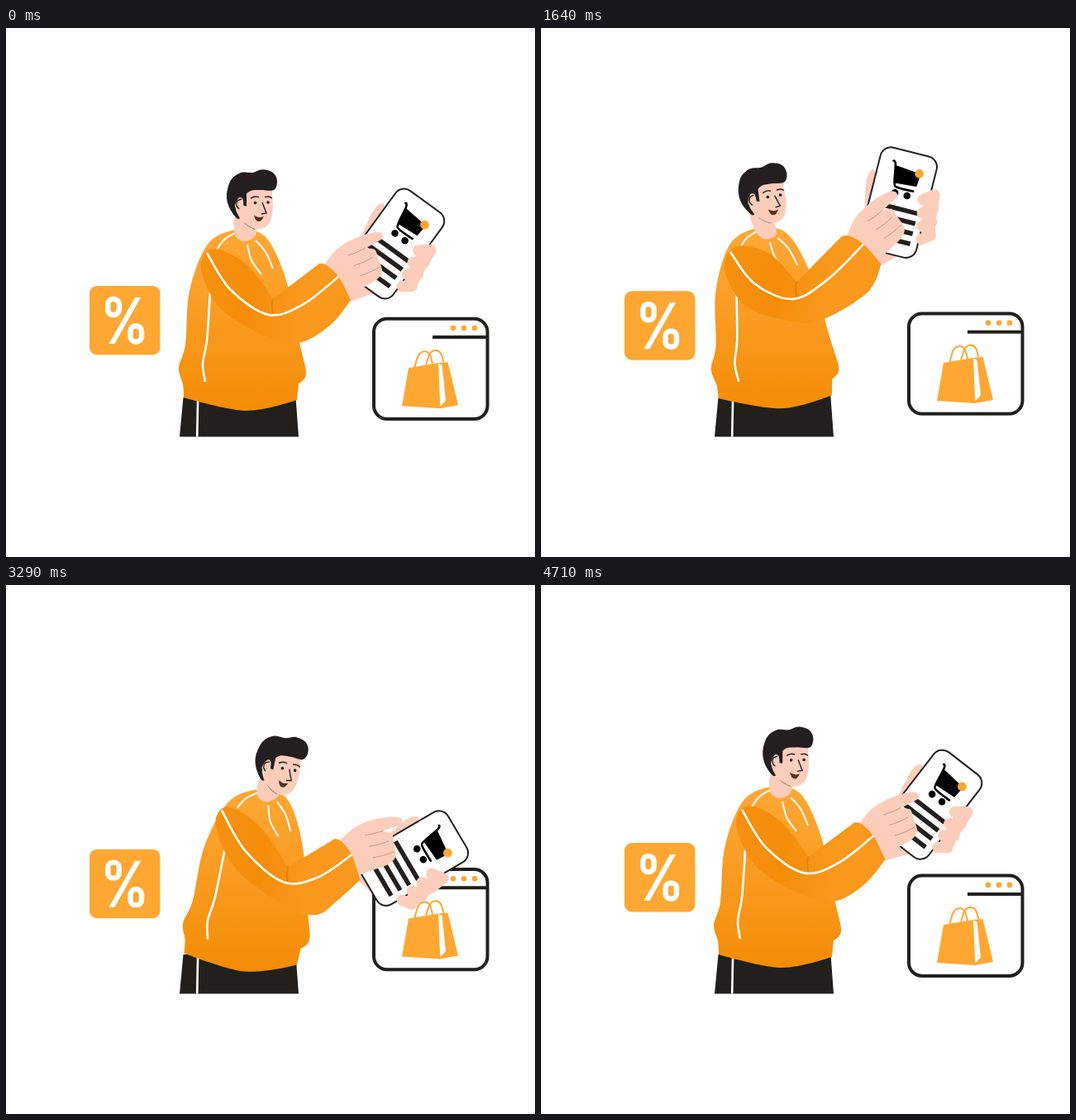
Write an HTML page with a canvas that moves like this. It is 640 px wide and 640 px high and loops after 4.78 s.

```html
<!DOCTYPE html>
<html lang="en">
<head>
<meta charset="utf-8">
<title>Mobile shopping</title>
<style>
html, body { margin: 0; width: 100%; height: 100%; overflow: hidden; background: #fff; }
canvas { display: block; width: 100vw; height: 100vh; }
</style>
</head>
<body>
<canvas id="stage" width="640" height="640"></canvas>
<script>
const ctx = document.getElementById('stage').getContext('2d');
const LOOP = 4780, STEPS = 67, STEP = LOOP / STEPS;
const ORANGE = '#ffa733', INK = '#21201d', HAIR = '#231f20', SKIN = '#fdcdbb', CREASE = '#b78f83';
const RAD = Math.PI / 180;

// Swing back (negative), through the middle, then forward. Softness blends
// a sine into a full ease, apart for the way out and the way home.
function swing(t, back, forward, softOut, softHome) {
  const phase = t / LOOP * 4, half = phase % 2;
  const p = half < 1 ? half : 2 - half;
  const soft = half < 1 ? softOut : softHome;
  const reach = Math.sin(p * Math.PI / 2) * (1 - soft) + (1 - Math.cos(p * Math.PI)) / 2 * soft;
  return phase < 2 ? -back * reach : forward * reach;
}
const bend = (u, linear, square) => linear * u + square * u * u;

function turn([x, y], angle) {
  const c = Math.cos(angle), s = Math.sin(angle);
  return [x * c - y * s, x * s + y * c];
}

// The upper body tips over the hips.
const leanBy = u => ([x, y, corner]) => {
  const a = bend(u, .113, .022);
  return [x + (450 - y) * a, y + (x - 235) * .6 * a, corner];
};

// The arm follows the shoulder sideways, lifts towards the hand, and turns at the wrist.
const armBy = (body, hand) => ([x, y, corner]) => {
  const reach = Math.max(0, Math.min(1, (x - 240) / 140));
  let px = x, py = y;
  if (x > 375) {
    const [rx, ry] = turn([x - 382, y - 291], bend(hand, 12, -2.7) * RAD);
    px = 382 + rx;
    py = 291 + ry;
  }
  return [px + bend(body, 17, 1), py + reach * bend(hand, 29.5, -6.5), corner];
};

// Spline through [x, y, corner] points.
function curve(pts, closed = true) {
  const n = pts.length;
  const at = i => closed ? pts[(i + n) % n] : pts[Math.max(0, Math.min(n - 1, i))];
  const tangent = i => {
    if (at(i)[2]) return [0, 0];
    const a = at(i - 1), b = at(i + 1);
    return [(b[0] - a[0]) / 6, (b[1] - a[1]) / 6];
  };
  ctx.beginPath();
  ctx.moveTo(pts[0][0], pts[0][1]);
  for (let i = 0; i < (closed ? n : n - 1); i++) {
    const a = at(i), b = at(i + 1), m = tangent(i), k = tangent(i + 1);
    ctx.bezierCurveTo(a[0] + m[0], a[1] + m[1], b[0] - k[0], b[1] - k[1], b[0], b[1]);
  }
}
function shape(pts, color) {
  curve(pts);
  ctx.fillStyle = color;
  ctx.fill();
}
function line(pts, color, width) {
  curve(pts, false);
  ctx.strokeStyle = color;
  ctx.lineWidth = width;
  ctx.stroke();
}
function poly(pts, color) {
  ctx.beginPath();
  pts.forEach(p => ctx.lineTo(p[0], p[1]));
  ctx.fillStyle = color;
  ctx.fill();
}
function dot(x, y, r, color) {
  ctx.beginPath();
  ctx.arc(x, y, r, 0, Math.PI * 2);
  ctx.fillStyle = color;
  ctx.fill();
}
function box(x, y, w, h, r, fill, stroke, width) {
  ctx.beginPath();
  ctx.roundRect(x, y, w, h, r);
  if (fill) { ctx.fillStyle = fill; ctx.fill(); }
  if (stroke) { ctx.strokeStyle = stroke; ctx.lineWidth = width; ctx.stroke(); }
}
function gradient(x0, y0, x1, y1, ...colors) {
  const g = ctx.createLinearGradient(x0, y0, x1, y1);
  colors.forEach((c, i) => g.addColorStop(i / (colors.length - 1), c));
  return g;
}
function placed(x, y, angle, draw) {
  ctx.save();
  ctx.translate(x, y);
  ctx.rotate(angle);
  draw();
  ctx.restore();
}

function drawTile(y) {
  placed(101, y, 0, () => {
    box(0, 0, 85.5, 83.5, 9, ORANGE);
    box(22.3, 16, 13.4, 19, 6, null, '#fff', 6.4);
    box(49.6, 48.5, 13.4, 19, 6, null, '#fff', 6.4);
    poly([[55, 14], [62, 14], [30.5, 70], [23.5, 70]], '#fff');
  });
}

function drawWindow(y) {
  placed(445, y, 0, () => {
    box(0, 0, 137.5, 121.3, 16, '#fff', INK, 4);
    line([[71, 22.3], [137, 22.3]], INK, 4);
    for (let i = 0; i < 3; i++) dot(96 + 13 * i, 11.3, 3.3, ORANGE);
    poly([[42, 59.5], [78.5, 53.5], [89.5, 52.5], [102, 104.5], [80, 108.5], [34, 105.5]], ORANGE);
    poly([[78, 54], [82.5, 56], [87, 99], [80.3, 106]], '#fff');
    line([[49.5, 59], [54, 44], [62, 39.5], [68, 44], [71, 55]], ORANGE, 2);
    line([[63, 56], [68, 42], [75, 38.3], [81, 42], [84.5, 53]], ORANGE, 2);
  });
}

function drawBody(lean) {
  poly([[210, 494.5], [214.5, 447], [350, 440], [354, 494.5]], INK);
  line([[232.3, 440], [231.2, 494.5]], '#fff', 2.6);
  const torso = [
    [273, 245], [243, 263], [222, 318], [217, 383], [209, 411], [214, 431], [215, 447, 1], [290, 463],
    [352, 450, 1], [354, 430, 1], [363, 418], [355, 380], [341, 312], [322, 264], [303, 246]
  ];
  shape(torso.map(lean), gradient(0, 245, 0, 462, '#ffa836', '#f99b20', '#f48c06'));
  line([[277, 248], [264, 256], [255, 268]].map(lean), '#fff', 2);
  line([[292, 262], [297, 281], [309, 298]].map(lean), '#fff', 2);
  line([[302, 257], [314, 271], [323, 291]].map(lean), '#fff', 2);
  line([[247, 320], [243, 378], [238, 406], [241, 428]].map(lean), '#fff', 2.6);
}

function drawHead(u, lean) {
  const x = 298 + bend(u, 32.5, 2.5), y = 208 + bend(u, 8.5, 1.5), tilt = bend(u, 10, 2) * RAD;
  const jaw = p => {
    const [dx, dy] = turn(p, tilt);
    return [x + dx, y + dy];
  };
  shape([jaw([-20, 20]), ...[[277, 250], [288, 258], [301, 252]].map(lean), jaw([3, 30])], SKIN);
  placed(x, y, tilt, () => {
    poly([[-11, 27], [3, 30], [3, 36], [-5, 32]], '#8b7a74');
    shape([[-20, -14], [20, -18], [24, -4], [24.5, 14], [20, 29], [7, 35.5], [-9, 28], [-18, 16]], SKIN);
    shape([
      [-19, 22], [-28, 9], [-31, -6], [-26, -24], [-14, -33], [0, -33], [12, -36.8], [25, -33], [30, -23],
      [26, -12], [10, -12], [-2, -11], [-9, -4], [-8, 8, 1], [-13, 0], [-20, 10], [-15, 22, 1]
    ], HAIR);
    shape([[-16, -3], [-21, 7], [-17, 13], [-12, 10], [-11, 0]], SKIN);
    line([[-13, -1], [-18, 1], [-19, 7], [-16, 11]], HAIR, 1.4);
    poly([[-12, -8], [-7, -8], [-7, 7.5], [-10.5, 7]], HAIR);
    dot(3.5, 3.5, 1.8, HAIR);
    dot(19, 3, 1.8, HAIR);
    line([[-2, -2], [3, -4], [8, -3.5]], HAIR, 1.4);
    line([[15, -3.5], [20, -4], [24, -2]], HAIR, 1.4);
    line([[12, 3], [17, 16, 1], [11, 17]], HAIR, 1.4);
    shape([[2, 18.5, 1], [8, 21], [14, 20, 1], [10, 25.5], [5, 25]], '#54301f');
  });
}

function drawPhone(u, arm) {
  const x = 470 + bend(u, 31, -9), y = 261 + bend(u, 61.5, 9.5), tilt = (36 + bend(u, 23.5, .5)) * RAD;
  const onPhone = p => {
    const [dx, dy] = turn(p, tilt);
    return [x + dx, y + dy];
  };
  poly([arm([395, 290]), arm([416, 331]), onPhone([16, 62]), onPhone([0, 30])], SKIN);
  placed(x, y, tilt, () => {
    shape([[-40, -31], [-44, -22], [-42, -3], [-36, 18], [-30, 0], [-34, -26]], SKIN);
    box(-35, -63, 70, 126, 13, '#fff', INK, 2);
    poly([[-14, -43], [18, -40], [16.5, -24], [-10, -22]], '#000');
    line([[-19, -48], [-15, -45], [-10.5, -22], [-6, -17.5], [15, -17.5]], '#000', 2.6);
    dot(-7, -10.5, 4.3, '#000');
    dot(8, -10.5, 4.3, '#000');
    dot(16, -40, 5.4, ORANGE);
    for (let i = 0; i < 4; i++) line([[-28, 7.3 + 12.6 * i], [26, 7.3 + 12.6 * i]], INK, 5.6);
    shape([[30, -10], [44, -23], [48, -8], [49, 10], [52, 26], [45, 36], [36, 28]], SKIN);
    ctx.lineCap = 'round';
    for (let i = 0; i < 4; i++) {
      line([[28 + 3.3 * i, -10.5 + 15.6 * i], [40 + 2.4 * i, -19.5 + 16.2 * i]], SKIN, 13.6);
    }
    ctx.lineCap = 'butt';
  });
}

function drawArm(arm) {
  const hand = [
    [382, 291, 1], [401, 267], [428, 252], [451, 247], [456, 254], [443, 262], [434, 267, 1],
    [446, 268], [450, 279, 1], [455, 293], [450, 303], [436, 312], [414, 324, 1]
  ];
  shape(hand.map(arm), SKIN);
  for (let i = 0; i < 3; i++) {
    const crease = [[414 + 7 * i, 275 + 12.5 * i], [425 + 8 * i, 271 + 12 * i], [435 + 8.5 * i, 266 + 11.5 * i]];
    line(crease.map(arm), CREASE, .9);
  }
  const sleeve = [
    [250, 267], [236, 292], [262, 342], [322, 376], [358, 380], [394, 358], [417, 329, 1],
    [403, 302], [388, 287], [379, 285, 1], [323, 328, 1], [290, 285]
  ].map(arm);
  shape(sleeve, gradient(sleeve[1][0], 310, sleeve[6][0], 340, '#f69110', '#f58d09', '#f9991e', '#f8981c'));
  line([[323, 327], [322, 336], [323, 345]].map(arm), '#dc830d', 2);
  line([[243, 272], [272, 317], [318, 347], [360, 334], [402, 301]].map(arm), '#fff', 2.6);
}

function render(t) {
  const body = swing(t, 1.23, 1.08, 0, 1);
  const head = swing(t, 1.24, 1.08, .4, .7);
  const phone = swing(t, 1.2, 1.1, .4, .3);
  // The finger stays up a little longer before it comes down again.
  const linger = .36 * Math.exp(-(((t - 2230) / 350) ** 2));
  const hand = swing(t, 1.16, 1.1, .5, .2) - linger;
  const bob = 4.5 * (1 - Math.cos(4 * Math.PI * t / LOOP));
  const lean = leanBy(body), arm = armBy(body, hand);

  ctx.fillStyle = '#fff';
  ctx.fillRect(0, 0, 640, 640);
  drawTile(312 + bob);
  drawWindow(351.7 - bob);
  drawBody(lean);
  drawHead(head, lean);
  drawPhone(phone, arm);
  drawArm(arm);
}

const start = performance.now();
function tick() {
  const t = (performance.now() - start) % LOOP;
  render(Math.floor((t + 3) / STEP) % STEPS * STEP);
  requestAnimationFrame(tick);
}
tick();
</script>
</body>
</html>
```
